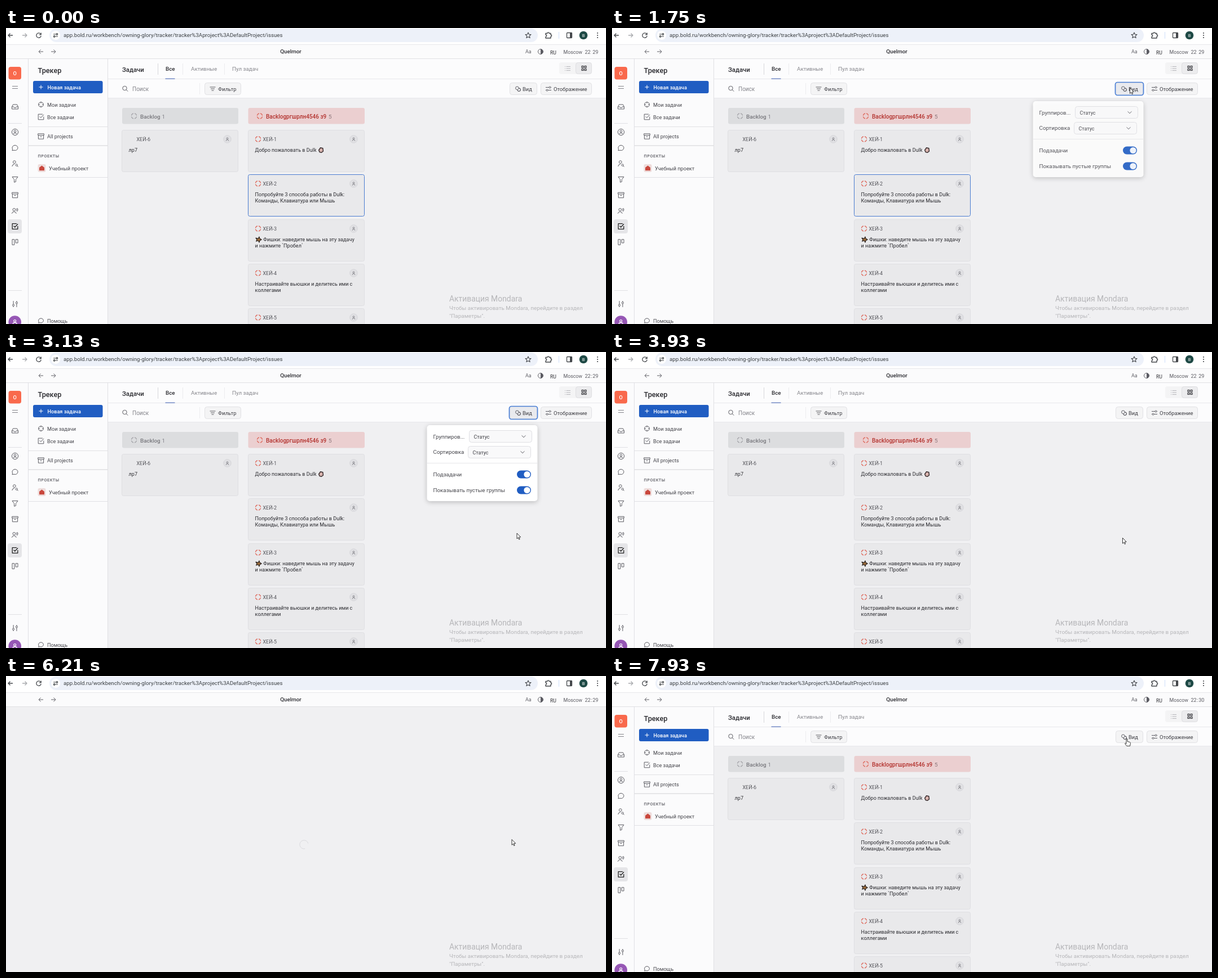
Recreate the animation shown at these times as an HTML page with a canvas. Size 1064 px wide and 526 px high, loop 8 s.

```html
<!DOCTYPE html>
<html lang="ru">
<head>
<meta charset="utf-8">
<title>Трекер</title>
<style>
html, body { margin: 0; width: 100%; height: 100%; overflow: hidden; background: #fbfbfc; }
canvas { display: block; width: 1064px; height: 526px; }
</style>
</head>
<body>
<canvas id="stage" width="1064" height="526"></canvas>
<script>
const ctx = document.getElementById('stage').getContext('2d');
const LOOP = 8000;
const INK = '#2b2b30', MID = '#5c5c63', SOFT = '#85858b', BLUE = '#205dc2', RED = '#dd6558';
const LINE = '#e0e0e4', PANEL = '#fbfbfc', BOARD = '#f0f0f2';

// ---- drawing helpers ----
function text(s, x, yc, size, color = INK, weight = 400, align = 'left') {
  ctx.font = `${weight} ${size}px Roboto, sans-serif`;
  ctx.fillStyle = color;
  ctx.textAlign = align;
  ctx.fillText(s, x, yc + size * 0.355);
}

function box(x, y, w, h, r, fill, stroke, lw = 1) {
  ctx.beginPath();
  ctx.roundRect(x, y, w, h, r);
  if (fill) { ctx.fillStyle = fill; ctx.fill(); }
  if (stroke) { ctx.strokeStyle = stroke; ctx.lineWidth = lw; ctx.stroke(); }
}

function rect(x, y, w, h, fill) {
  ctx.fillStyle = fill;
  ctx.fillRect(x, y, w, h);
}

function disc(x, y, r, fill, stroke, lw = 1) {
  ctx.beginPath();
  ctx.arc(x, y, r, 0, Math.PI * 2);
  if (fill) { ctx.fillStyle = fill; ctx.fill(); }
  if (stroke) { ctx.strokeStyle = stroke; ctx.lineWidth = lw; ctx.stroke(); }
}

function icon(d, x, y, color = MID, lw = 1, fill) {
  const p = new Path2D(d);
  ctx.save();
  ctx.translate(x, y);
  ctx.lineJoin = 'round';
  if (fill) { ctx.fillStyle = fill; ctx.fill(p); }
  if (lw) { ctx.strokeStyle = color; ctx.lineWidth = lw; ctx.stroke(p); }
  ctx.restore();
}

// four arcs centred on the diagonals
function dashedRing(x, y, color) {
  ctx.strokeStyle = color;
  ctx.lineWidth = 1.1;
  for (let i = 0; i < 4; i++) {
    const a = (i + .5) * Math.PI / 2;
    ctx.beginPath();
    ctx.arc(x, y, 4.7, a - .58, a + .58);
    ctx.stroke();
  }
}

function spinner(x, y, t) {
  const a = t / 1000 * Math.PI * 2;
  ctx.beginPath();
  ctx.arc(x, y, 7.6, a, a + 4.7);
  ctx.strokeStyle = '#dadade';
  ctx.lineWidth = 1;
  ctx.stroke();
}

const ICON = {
  back: 'M4 0H-4M-.5 -3.5L-4 0L-.5 3.5',
  next: 'M-4 0H4M.5 -3.5L4 0L.5 3.5',
  reload: 'M3.4 -2.4A4.2 4.2 0 1 0 4.2 .8M4.2 -4.5V-1.2H.9',
  cross: 'M-3.4 -3.4L3.4 3.4M3.4 -3.4L-3.4 3.4',
  star: 'M0 -5L1.4 -1.7L5 -1.4L2.3 1L3.1 4.6L0 2.7L-3.1 4.6L-2.3 1L-5 -1.4L-1.4 -1.7Z',
  puzzle: 'M-5 -3.5H-2A1.6 1.6 0 0 1 1.2 -3.5H4V-1A1.6 1.6 0 0 1 4 2.2V5H-5V2.4A1.7 1.7 0 0 0 -5 -1Z',
  sliders: 'M-5 -2.5H1M4 -2.5H5M-5 2.5H-4M-1 2.5H5M1 -2.5A1.5 1.5 0 1 0 4 -2.5A1.5 1.5 0 1 0 1 -2.5M-4 2.5A1.5 1.5 0 1 0 -1 2.5A1.5 1.5 0 1 0 -4 2.5',
  tray: 'M-5.5 0L-3.5 -4H3.5L5.5 0V4H-5.5ZM-5.5 0H-2.2L-1 1.8H1L2.2 0H5.5',
  person: 'M-1.9 -1.6A1.9 1.9 0 1 0 1.9 -1.6A1.9 1.9 0 1 0 -1.9 -1.6M-3.6 4Q-3.2 1.4 0 1.4T3.6 4',
  chat: 'M-5 4.8L-4.4 2.2A5 4.6 0 1 1 -2 4.2Z',
  finder: 'M-3.5 -2.8A2.4 2.4 0 1 0 1.3 -2.8A2.4 2.4 0 1 0 -3.5 -2.8M-5.2 5Q-5 1.2 -1 1.2M1 2.6A1.7 1.7 0 1 0 4.4 2.6A1.7 1.7 0 1 0 1 2.6M4 4L5.6 5.6',
  funnel: 'M-5 -4.5H5L1.4 .3V4.2L-1.4 5.2V.3Z',
  archive: 'M-5.3 -4.7H5.3V-2H-5.3ZM-4.6 -2V4.7H4.6V-2M-1.7 .6H1.7',
  people: 'M-4 -2.2A2.3 2.3 0 1 0 .6 -2.2A2.3 2.3 0 1 0 -4 -2.2M-5.6 4.8Q-5.2 1.5 -1.7 1.5T2.2 4.8M2.3 -4.2Q4 -2.2 2.3 -.2M4 -5Q6.5 -2.2 3.6 1.2',
  check: 'M4.8 -.5V4.8H-4.8V-4.8H3M-2.4 -.8L-.2 1.5L5 -4.2',
  board: 'M-5 -4.8H-1.2V4.8H-5ZM1.2 -4.8H5V1.4H1.2Z',
  equalizer: 'M-2.9 -5.5V.5M-2.9 3.7V5.5M2.9 -5.5V-3.7M2.9 -.5V5.5M-4.5 2.1A1.6 1.6 0 1 0 -1.3 2.1A1.6 1.6 0 1 0 -4.5 2.1M1.3 -2.1A1.6 1.6 0 1 0 4.5 -2.1A1.6 1.6 0 1 0 1.3 -2.1',
  target: 'M-4.4 0A4.4 4.4 0 1 0 4.4 0A4.4 4.4 0 1 0 -4.4 0M0 -4.4V-2M0 4.4V2M-4.4 0H-2M4.4 0H2',
  links: 'M-4.4 -1.2A2.8 2.8 0 1 1 1.2 -1.2A2.8 2.8 0 1 1 -4.4 -1.2M-1.2 1.5A2.8 2.8 0 1 0 1.4 -1.1A2.8 2.8 0 1 1 -1 2.4',
  chevron: 'M-3.5 -1.7L0 1.7L3.5 -1.7',
  arrow: 'M0 0V9.8L2.2 7.8L3.8 11.2L5.2 10.5L3.7 7.2L6.7 6.9Z',
  hand: 'M-1 0Q0 -1 1 0V4.4L5.4 5.6Q6.6 6 6.4 7.4L5.6 12.4H-.2L-3.2 8.6Q-3.6 7.2 -2.4 7.3L-1 8.4Z'
};

// ---- timeline ----
const clamp = v => Math.max(0, Math.min(1, v));
const ramp = (t, a, b) => clamp((t - a) / (b - a));

const BLINKS = [70, 570, 1080, 1580, 2080, 2580, 3130, 3590, 4100, 4610, 5140, 5600, 6060, 6600, 7100, 7600, 7930];
const colonOn = t => BLINKS.filter(b => t >= b).length % 2 === 1;

// time, x, y of the pointer tip
const PATH = [
  [320, 1040, 515], [480, 985, 372], [670, 930, 264], [870, 930, 262], [1150, 926, 190], [1450, 919, 108],
  [1600, 918.5, 106.5], [1800, 918.5, 106.5], [2100, 914, 176], [2370, 911, 267], [2500, 910.5, 257.5],
  [2720, 909, 290], [2980, 906, 322], [3450, 906, 322], [3730, 905.5, 335], [3870, 905.5, 335],
  [3930, 905.5, 330.5], [4280, 897, 290.5], [6480, 897, 290.5], [6660, 922, 225], [6830, 940, 171.5],
  [7050, 942, 176], [7230, 939, 189], [7300, 937, 186], [7540, 922, 144], [7760, 911, 113], [7930, 913, 112]
];

function pointerAt(t) {
  const i = PATH.findIndex(p => p[0] > t);
  if (i < 0) return PATH[PATH.length - 1].slice(1);
  const [t0, x0, y0] = PATH[i - 1], [t1, x1, y1] = PATH[i];
  const k = (t - t0) / (t1 - t0);
  return [x0 + (x1 - x0) * k, y0 + (y1 - y0) * k];
}

function drawPointer(t) {
  if (t < PATH[0][0]) return;
  const [x, y] = pointerAt(t);
  const menu = t > 1600 && t < 3500;
  const overButton = x > 892 && x < 943 && y > 96 && y < 119 && !menu;
  const overSwitch = menu && y > 206 && y < 275;
  icon(overButton || overSwitch ? ICON.hand : ICON.arrow, x, y, '#222', 0.9, '#fff');
}

// ---- page parts ----
function browserBar(loading) {
  rect(0, 0, 1064, 30, '#fff');
  rect(0, 29, 1064, 1, '#e6e7ea');
  icon(ICON.back, 8, 13, '#45484c', 1.3);
  icon(ICON.next, 33, 13, '#a9abae', 1.3);
  icon(loading ? ICON.cross : ICON.reload, 58, 13, '#45484c', 1.3);
  box(77, 1, 866, 24, 12, '#edf1f9');
  disc(88, 13, 8, '#fff');
  icon('M-4 -2H0M0 2H4M1 -2A1.3 1.3 0 1 0 3.6 -2A1.3 1.3 0 1 0 1 -2M-3.6 2A1.3 1.3 0 1 0 -1 2A1.3 1.3 0 1 0 -3.6 2', 88, 13, '#3c4043', 1.2);
  text('app.bold.ru/workbench/owning-glory/tracker/tracker%3Aproject%3ADefaultProject/issues', 102, 13, 9.71, '#3c4043');
  icon(ICON.star, 926, 13, '#45484c', 1.1);
  icon(ICON.puzzle, 962, 13, '#45484c', 1.4);
  rect(980, 7, 1, 12, '#cfe0fb');
  box(994.5, 8.5, 9, 9, 1, null, '#45484c', 1.3);
  rect(1000, 8.5, 4, 9, '#45484c');
  disc(1024, 13, 7.3, '#1f4a46');
  text('B', 1024, 13, 7.5, '#fff', 400, 'center');
  [9, 13, 17].forEach(y => disc(1049, y, 1.1, '#45484c'));
}

function statusBar(t) {
  rect(0, 30, 1064, 25, PANEL);
  rect(0, 54, 1064, 1, LINE);
  icon(ICON.back, 62, 42, MID);
  icon(ICON.next, 84, 42, MID);
  text('Quelmor', 505, 42, 9.8, INK, 500, 'center');
  text('Aa', 921, 42, 8.8, MID);
  disc(948, 42, 4.5, null, MID);
  icon('M0 -4.5A4.5 4.5 0 0 1 0 4.5Z', 948, 42, MID, 0, MID);
  text('RU', 965, 43.5, 8.6, INK);
  text('Moscow', 988.5, 43, 8.8, MID);
  text('22', 1026.5, 43, 9, MID);
  text(t < 7600 ? '29' : '30', 1040.3, 43, 9, MID);
  if (colonOn(t)) text(':', 1037.2, 43, 9, MID);
}

function rail() {
  rect(0, 55, 40, 471, PANEL);
  rect(39, 55, 1, 471, LINE);
  box(4.5, 69, 22.5, 22.5, 4, '#f9694c');
  text('O', 15.7, 80.3, 9.2, '#fff', 500, 'center');
  rect(11, 103, 10, 1, SOFT);
  rect(11, 107, 10, 1, SOFT);
  icon(ICON.tray, 16, 140);
  rect(4, 169, 24, 1, LINE);
  disc(16, 185, 5.6, null, MID);
  icon('M-1.8 -1.4A1.8 1.8 0 1 0 1.8 -1.4A1.8 1.8 0 1 0 -1.8 -1.4M-3.4 3.8Q-3 1.6 0 1.6T3.4 3.8', 16, 185);
  ['chat', 'finder', 'funnel', 'archive', 'people'].forEach((k, i) => icon(ICON[k], 16, 213 + i * 28));
  box(3, 340, 25, 25, 4, '#e5e5e8');
  icon(ICON.check, 16, 352.5, '#222', 1.3);
  icon(ICON.board, 16, 380.5);
  rect(4, 466, 24, 1, LINE);
  icon(ICON.equalizer, 16, 490.5);
  disc(15.7, 522.5, 11.3, '#9657b5');
  icon(ICON.person, 15.7, 522, '#fff', 1.2);
}

function sideNav() {
  rect(40, 55, 140, 471, PANEL);
  rect(180, 55, 1, 471, LINE);
  text('Трекер', 56.5, 75.5, 12.7, INK, 500);
  box(48, 94, 123.5, 22, 3, BLUE);
  icon('M-3.5 0H3.5M0 -3.5V3.5', 62, 105, '#fff');
  text('Новая задача', 73.5, 105.5, 9.15, '#fff', 500);
  icon(ICON.target, 62, 136);
  text('Мои задачи', 73, 136.5, 9.15, '#45454b');
  icon(ICON.check, 62, 158, MID, 1);
  text('Все задачи', 73, 159, 9.15, '#45454b');
  rect(40, 175, 140, 1, LINE);
  icon(ICON.archive, 62, 192.5, MID, 1);
  text('All projects', 73, 193, 9.2, '#45454b');
  rect(40, 208.5, 140, 1, '#d2d2d6');
  ctx.letterSpacing = '0.6px';
  text('ПРОЕКТЫ', 56.5, 227, 7.2, MID, 500);
  ctx.letterSpacing = '0px';
  box(56.5, 242, 14, 14, 3, '#eedddc');
  icon('M-4.5 -1L0 -4.5L4.5 -1V4.3H-4.5Z', 63.5, 249, RED, 0, '#c9473d');
  text('Учебный проект', 76, 249.5, 9.15, '#45454b');
  rect(40, 265, 140, 1, LINE);
  icon('M-4.4 4.2L-3.8 2A4.4 4 0 1 1 -1.8 3.6Z', 62, 520);
  text('Помощь', 73, 520.5, 9.1, '#45454b');
}

function button(x, w, label, labelX, focused) {
  box(x + .5, 97.5, w - 1, 21, 4, focused ? '#e9eaee' : '#f4f4f5', '#e1e1e4');
  if (focused) box(x - .5, 96.5, w + 1, 23, 4, null, '#4a7fd6', 1.7);
  text(label, labelX, 108.5, 9.4, '#3d3d43');
}

function toolbar(focused) {
  rect(181, 55, 883, 70, '#fcfcfd');
  rect(181, 90, 883, 1, '#e8e8eb');
  rect(181, 124, 883, 1, '#e8e8eb');
  text('Задачи', 206, 73.5, 11.3, INK, 500);
  [269, 313, 387].forEach((x, i) => rect(x, 63, 1, 20, i ? '#ececef' : '#d8d8dc'));
  text('Все', 283, 73, 9.8, INK, 500);
  text('Активные', 328, 73, 9.8, SOFT);
  text('Пул задач', 401, 73, 9.8, SOFT);
  rect(282.5, 89.5, 17, 1.5, '#7389c4');
  disc(210.5, 107, 3.7, null, MID);
  icon('M0 0L3 3', 213.2, 109.7);
  text('Поиск', 224, 108.5, 10, SOFT);
  rect(343, 98, 1, 20, '#ececef');
  button(352, 65, 'Фильтр', 376, false);
  icon('M-5 -3H5M-3.5 0H3.5M-2 3H2', 366.5, 108, MID, 1.2);
  button(893, 49, 'Вид', 916, focused);
  icon(ICON.links, 908, 108);
  button(948, 91, 'Отображение', 971, false);
  icon(ICON.sliders, 962, 108);
  box(981, 61, 58, 21, 4, '#f4f4f5');
  box(1010.5, 61.5, 28, 20, 4, '#ececee', '#dfdfe2');
  icon('M-5 -3.5H-4M-2.5 -3.5H5M-5 0H-4M-2.5 0H5M-5 3.5H-4M-2.5 3.5H5', 996, 72, '#b4b4b9');
  icon('M-4 -4H-1V-1H-4ZM1 -4H4V-1H1ZM-4 1H-1V4H-4ZM1 1H4V4H1Z', 1025, 71.5, INK, 1.1);
}

function card(x, y, id, lines, opts = {}) {
  box(x - .5, y + .5, 206, 74, 3, '#e9e9eb', opts.focused ? '#4a7cd0' : '#dfdfe2');
  if (opts.ring) dashedRing(x + 17, y + 16.5, RED);
  text(id, x + 25.5, y + 16.5, 8.95, '#55555b');
  disc(x + 186.5, y + 16.5, 6.8, '#e0e0e3', '#d2d2d6', .8);
  icon('M-1.4 -1.2A1.4 1.4 0 1 0 1.4 -1.2A1.4 1.4 0 1 0 -1.4 -1.2M-2.2 3.2Q-2 .9 0 .9T2.2 3.2', x + 186.5, y + 16.5, '#77777d', .9);
  lines.forEach((s, i) => text(s, x + 11.6 + (i ? 0 : opts.indent || 0), y + 35.5 + i * 11.7, 9.08, INK));
}

const CARDS = [
  ['Добро пожаловать в Dulk'],
  ['Попробуйте 3 способа работы в Dulk:', 'Команды, Клавиатура или Мышь'],
  ['Фишки: наведите мышь на эту задачу', 'и нажмите `Пробел`'],
  ['Настраивайте вьюшки и делитесь ими с', 'коллегами'],
  []
];

function columns(focused) {
  box(206, 142, 206, 28.5, 3, '#dcdddf');
  dashedRing(227, 156.5, '#a3a3a8');
  text('Backlog', 238, 157, 9.9, '#77777c', 500);
  text('1', 276.5, 157, 9.9, SOFT);
  card(206, 181, 'ХЕЙ-6', ['лр7']);

  box(429.5, 142, 206.5, 28.5, 3, '#ebcfd0');
  dashedRing(450, 156.5, RED);
  text('Backlogpгшрлн4546 з9', 461, 157, 10, '#b3322e', 500);
  text('5', 572, 157, 9.9, '#8a7377');
  CARDS.forEach((lines, i) =>
    card(430, Math.round(181 + i * 79.3), 'ХЕЙ-' + (i + 1), lines, { ring: true, focused: focused && i === 1, indent: i === 2 ? 14.5 : 0 }));

  // emoji
  icon('M-3.8 0L-1 -4.2L3.4 -3.2L4 2L1 4.2L-2.4 3.6Z', 558.5, 217, '#33282a', 1.4, '#d9b4ae');
  icon('M1 -5L2.2 -1.6L5.2 0L2.2 1.6L1 5L-.6 1.8L-4.4 3L-3 .2L-5 -2.8L-.8 -1.6Z', 448, 376, '#2d2522', 1.2, '#a4713c');
}

function select(x, y) {
  box(x + .5, y + .5, 111, 21, 4, '#f9f9fa', '#dfdfe3');
  text('Статус', x + 8.5, y + 11.5, 8.95, '#3d3d43');
  icon(ICON.chevron, x + 97, y + 11, MID);
}

function toggle(y) {
  box(906, y - 7, 25, 14, 7, BLUE);
  disc(924, y, 5.6, '#fff');
}

function viewMenu(alpha) {
  if (!alpha) return;
  ctx.save();
  ctx.globalAlpha = alpha;
  ctx.shadowColor = 'rgba(0,0,0,.22)';
  ctx.shadowBlur = 9;
  ctx.shadowOffsetY = 2;
  box(746.5, 130, 196, 135, 5, '#fff');
  ctx.shadowColor = 'transparent';
  text('Группиров...', 757.5, 150.5, 9.8, '#45454b');
  select(821, 139);
  text('Сортировка', 757.5, 178, 9.8, '#45454b');
  select(819, 167);
  rect(746.5, 197, 196, 1, '#e6e6e9');
  text('Подзадачи', 757.5, 217.5, 9.8, '#45454b');
  toggle(217.5);
  text('Показывать пустые группы', 757.5, 245.5, 9.8, '#45454b');
  toggle(245.5);
  ctx.restore();
}

function notice() {
  const c = '#b6b6b9';
  text('Активация Mondara', 786, 481, 13.9, c);
  text('Чтобы активировать Mondara, перейдите в раздел', 786, 497, 9.95, c);
  text('"Параметры".', 786, 511, 9.95, c);
}

function draw(t) {
  const splash = t >= 5940 && t < 6480;
  const menuAlpha = ramp(t, 1600, 1765) * (1 - ramp(t, 3450, 3620));

  rect(0, 0, 1064, 526, BOARD);
  browserBar(t >= 5540 && t < 5940);
  statusBar(t);
  if (splash) {
    if (t >= 6060) spinner(528.5, 299.5, t);
  } else {
    rail();
    sideNav();
    toolbar(t >= 1540 && t < 3560);
    if (t >= 6480 && t < 7040) spinner(622.5, 335, t);
    else columns(t < 2750);
  }
  viewMenu(menuAlpha);
  notice();
  drawPointer(t);
}

const start = performance.now();
function tick(now) {
  draw(Math.max(0, now - start) % LOOP);
  requestAnimationFrame(tick);
}
draw(0);
requestAnimationFrame(tick);
</script>
</body>
</html>
```
